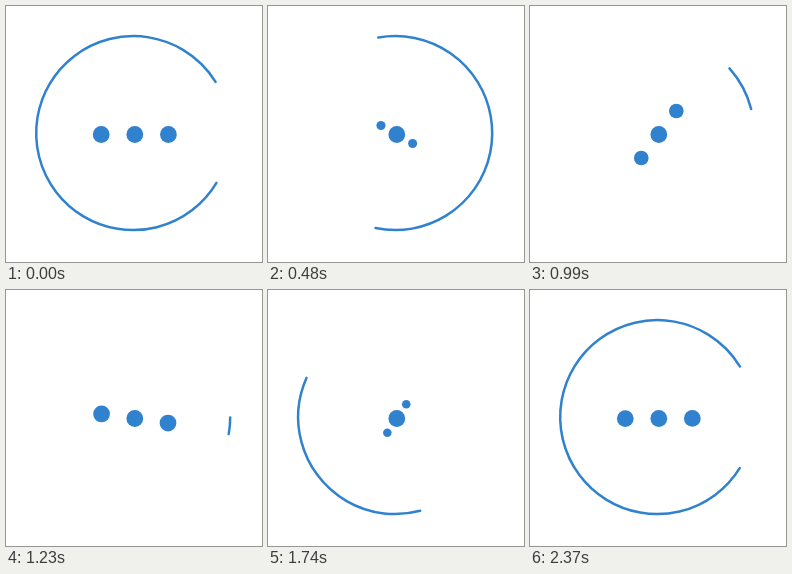
An HTML page with a canvas that plays this animation: 256x256 px, repeating every 2.4 s.

```html
<!DOCTYPE html>
<html lang="en">
<head>
<meta charset="utf-8">
<title>Loading spinner</title>
<style>
  html, body { margin: 0; width: 100%; height: 100%; overflow: hidden; background: #fff; }
  canvas { display: block; width: 256px; height: 256px; }
</style>
</head>
<body>
<canvas id="stage" width="256" height="256"></canvas>
<script>
const ctx = document.getElementById('stage').getContext('2d');
const LOOP = 2400, STEP = 30;
const BLUE = '#3182ce';
const RING = { x: 127.2, y: 127.1, r: 97, width: 2.5 };
const DOTS = { x: 128.8, y: 128.5, r: 8.4, gap: 33.6 };
const rad = deg => deg * Math.PI / 180;
const mix = (a, b, k) => a + (b - a) * k;

// Same curve as cubic-bezier(.42, 0, .58, 1)
function easeInOut(x) {
  let lo = 0, hi = 1;
  for (let i = 0; i < 30; i++) {
    const s = (lo + hi) / 2;
    if (s * (1.26 + s * (-0.78 + s * 0.52)) < x) lo = s; else hi = s;
  }
  return lo * lo * (3 - 2 * lo);
}

// Eased 0 -> 1 -> 0 over one period
function swing(t, period) {
  const p = (t % period) / period * 2;
  return easeInOut(p < 1 ? p : 2 - p);
}

function drawRing(t) {
  const k = swing(t, LOOP);
  ctx.lineWidth = RING.width;
  ctx.lineCap = 'round';
  ctx.beginPath();
  ctx.arc(RING.x, RING.y, RING.r, rad(mix(30.9, 721, k)), rad(mix(328.1, 730.6, k)));
  ctx.stroke();
}

function drawDot(x, y, r) {
  ctx.beginPath();
  ctx.arc(x, y, r, 0, 2 * Math.PI);
  ctx.fill();
}

function drawDots(t) {
  const scale = mix(1, 0.5, swing(t, LOOP / 2));
  const angle = 2 * Math.PI * easeInOut(t / LOOP);
  for (const side of [-1, 1]) {
    const d = side * DOTS.gap * scale;
    drawDot(DOTS.x + d * Math.cos(angle), DOTS.y + d * Math.sin(angle), DOTS.r * scale);
  }
  drawDot(DOTS.x, DOTS.y, DOTS.r);
}

function draw(elapsed) {
  const t = Math.floor((elapsed + 0.01) / STEP) * STEP % LOOP;
  ctx.fillStyle = '#fff';
  ctx.fillRect(0, 0, 256, 256);
  ctx.fillStyle = ctx.strokeStyle = BLUE;
  drawRing(t);
  drawDots(t);
}

let start;
function tick(now) {
  start ??= now;
  draw(now - start);
  requestAnimationFrame(tick);
}
draw(0);
requestAnimationFrame(tick);
</script>
</body>
</html>
```
